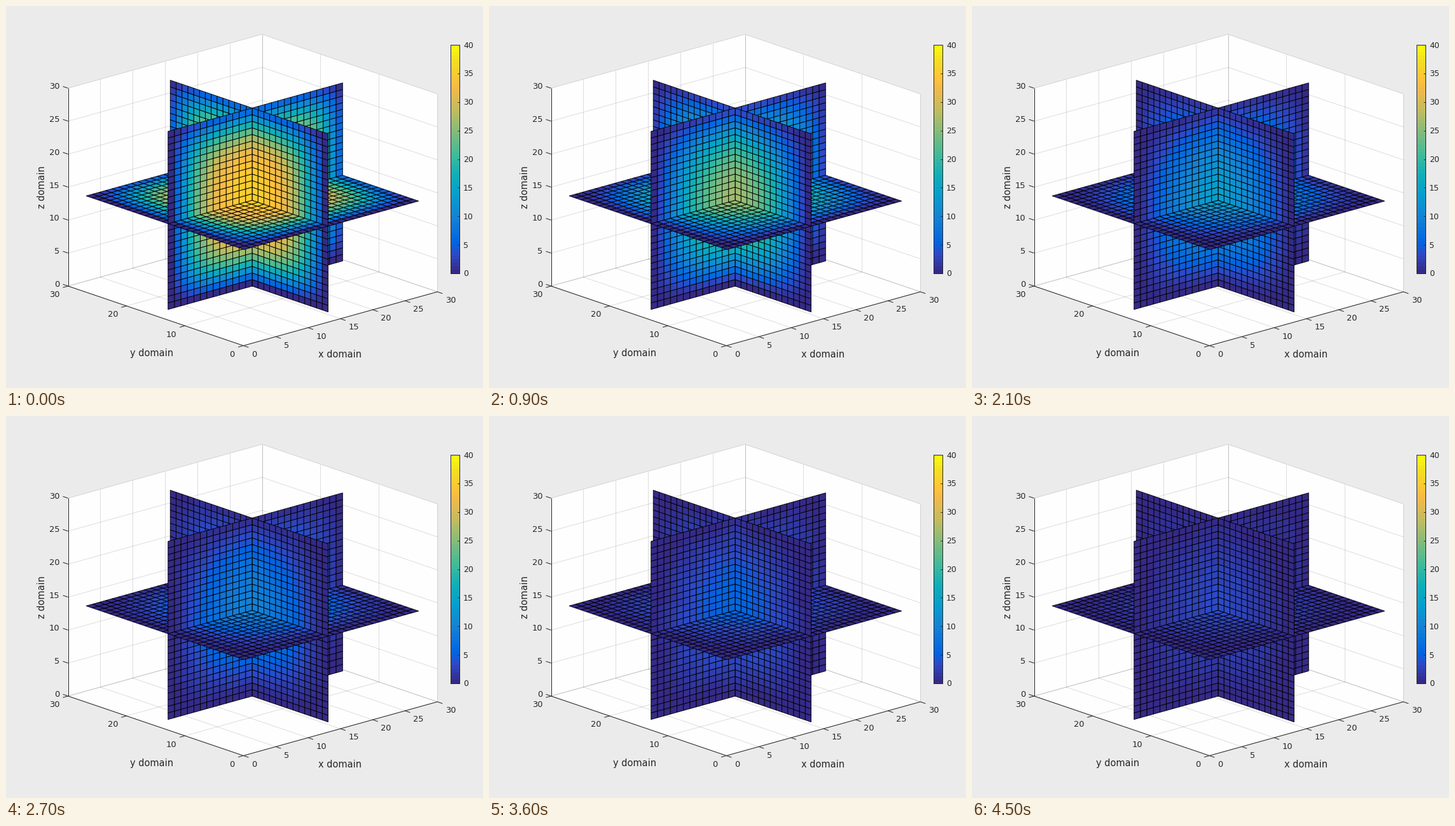
Animation, 750 px wide and 600 px high, one loop 4.8 s. Source, as a matplotlib script:

```python
import numpy as np
import matplotlib
import matplotlib.pyplot as plt
from matplotlib.animation import FuncAnimation
from matplotlib.collections import LineCollection, PolyCollection
from matplotlib.colors import LinearSegmentedColormap

W, H, DPI = 750, 600, 100
FRAMES, STEP = 16, 300
PX = 72 / DPI
INK = (0.15, 0.15, 0.15)
GRID = (*INK, 0.15)
N, MID, LEVELS, VMAX, SIDE = 28, 14, 64, 40, 30
START, TAU0, RATE = 36, 0.132, 0.06
matplotlib.rcParams["font.family"] = "DejaVu Sans"

# Screen position of the origin and of one unit along each axis
ORIGIN = np.array([373.3, 533.5])
AXES = np.array([[10.165, -2.82], [-9.19, -3.12], [0.0, -10.36]])

KEYS = {0: "#352a87", 5: "#2c4ac7", 8: "#0363e1", 16: "#1485d4",
        21: "#079ccf", 27: "#0faeb9", 33: "#42bb98", 45: "#c0bc60",
        51: "#f1b94a", 54: "#ffc337", 59: "#f5de21", 63: "#f9fb0e"}
CMAP = LinearSegmentedColormap.from_list(
    "heat", [(k / (LEVELS - 1), c) for k, c in KEYS.items()], N=LEVELS)


def project(p):
    return ORIGIN + np.asarray(p, float) @ AXES


def profile(tau):
    """Cooling of a uniform bar with cold ends, sampled at nodes 1..N."""
    u = np.arange(N) / (N - 1)
    n = np.arange(1, 40, 2)[:, None]
    f = (4 / (np.pi * n) * np.sin(np.pi * n * u) * np.exp(-n**2 * tau)).sum(0)
    return np.clip(f, 0, 1)


def piece(normal, rows, cols):
    """Corner nodes of the unit cells of one flat piece."""
    a, b = [i for i in range(3) if i != normal]
    for i in rows:
        for j in cols:
            quad = np.full((4, 3), MID)
            quad[:, a] = i, i + 1, i + 1, i
            quad[:, b] = j, j, j + 1, j + 1
            yield quad


LOW, HIGH, ALL = range(1, MID), range(MID, N), range(1, N)


def half(xs):
    """Pieces on one side of the x slice, back to front."""
    return [*piece(2, xs, HIGH), *piece(1, xs, ALL), *piece(2, xs, LOW)]


cells = np.array([*half(HIGH), *piece(0, ALL, ALL), *half(LOW)])
nodes = cells[:, 0] - 1


def heat(frame):
    f = profile(TAU0 + RATE * frame)
    value = START * f[nodes].prod(axis=1)
    return CMAP((value / VMAX * LEVELS).astype(int))


fig = plt.figure(figsize=(W / DPI, H / DPI), dpi=DPI, facecolor="#ebebeb")
ax = fig.add_axes([0, 0, 1, 1])
ax.set_xlim(0, W)
ax.set_ylim(H, 0)
ax.axis("off")


def lines(segs, color, z):
    ax.add_collection(LineCollection(segs, colors=[color], zorder=z,
                                     linewidths=PX))


def label(x, y, text, size, **kw):
    ax.text(x, y, text, fontsize=size * PX, color=INK, va="baseline",
            zorder=6, **kw)


# The floor and two back walls, each with its grid
walls, grid = [], []
for normal, level in enumerate((SIDE, SIDE, 0)):
    a, b = [i for i in range(3) if i != normal]

    def on_wall(u, v):
        p = np.full(3, level)
        p[[a, b]] = u, v
        return project(p)

    walls.append([on_wall(0, 0), on_wall(SIDE, 0),
                  on_wall(SIDE, SIDE), on_wall(0, SIDE)])
    for v in range(0, SIDE + 1, 10 if a == 1 else 5):
        grid.append([on_wall(v, 0), on_wall(v, SIDE)])
    for v in range(0, SIDE + 1, 10 if b == 1 else 5):
        grid.append([on_wall(0, v), on_wall(SIDE, v)])
ax.add_collection(PolyCollection(walls, facecolors="#fefefe",
                                 edgecolors="none", zorder=0))
lines(grid, GRID, 1)

# Axis lines, ticks and numbers
corners = project([(0, SIDE, SIDE), (0, SIDE, 0), (0, 0, 0), (SIDE, 0, 0)])
lines(list(zip(corners, corners[1:])), INK, 2)

out_y, out_x = (-v / np.hypot(*v) * 8.5 for v in AXES[:2])
ticks = []
for v in range(0, SIDE + 1, 5):
    p = project((v, 0, 0))
    ticks.append([p, p + out_x])
    label(p[0] + (17 if v < 10 else 21), p[1] + 17.3, v, 13, ha="center")
    p = project((0, SIDE, v))
    ticks.append([p, p - out_y * (-1, 1) if False else p + out_x * (-1, -1)])
    label(84.5, p[1] + 1, v, 13, ha="right")
    if v % 10 == 0:
        p = project((0, v, 0))
        ticks.append([p, p + out_y])
        label(p[0] - (18.5 if v < 10 else 21.5), p[1] + 17.3, v, 13,
              ha="center")
lines(ticks, INK, 2)

LABEL = 14.67
label(525.5, 552, "x domain", LABEL, ha="center")
label(229, 550, "y domain", LABEL, ha="center")
label(61, 284.5, "z domain", LABEL, ha="center", rotation=90,
      rotation_mode="anchor")

# Colour bar
LEFT, RIGHT, TOP, BOTTOM = 699, 713, 61, 420
ax.pcolormesh([LEFT, RIGHT + 1], np.linspace(BOTTOM, TOP, LEVELS + 1),
              np.arange(LEVELS)[:, None], cmap=CMAP, vmin=0,
              vmax=LEVELS - 1, zorder=3)
marks = [[(LEFT, TOP), (RIGHT, TOP), (RIGHT, BOTTOM), (LEFT, BOTTOM),
          (LEFT, TOP)]]
for v in range(0, VMAX + 1, 5):
    y = BOTTOM + (TOP - BOTTOM) * v / VMAX
    marks.append([(RIGHT - 3, y), (RIGHT, y)])
    label(719, y + 4.5, v, 12.5)
lines(marks, INK, 4)

slices = PolyCollection(project(cells), facecolors=heat(0),
                        edgecolors="black", linewidths=0.9 * PX, zorder=5)
ax.add_collection(slices)


def update(frame):
    slices.set_facecolor(heat(frame))
    return [slices]


anim = FuncAnimation(fig, update, frames=FRAMES, interval=STEP, repeat=True,
                     repeat_delay=0, blit=False)
plt.show()
```
